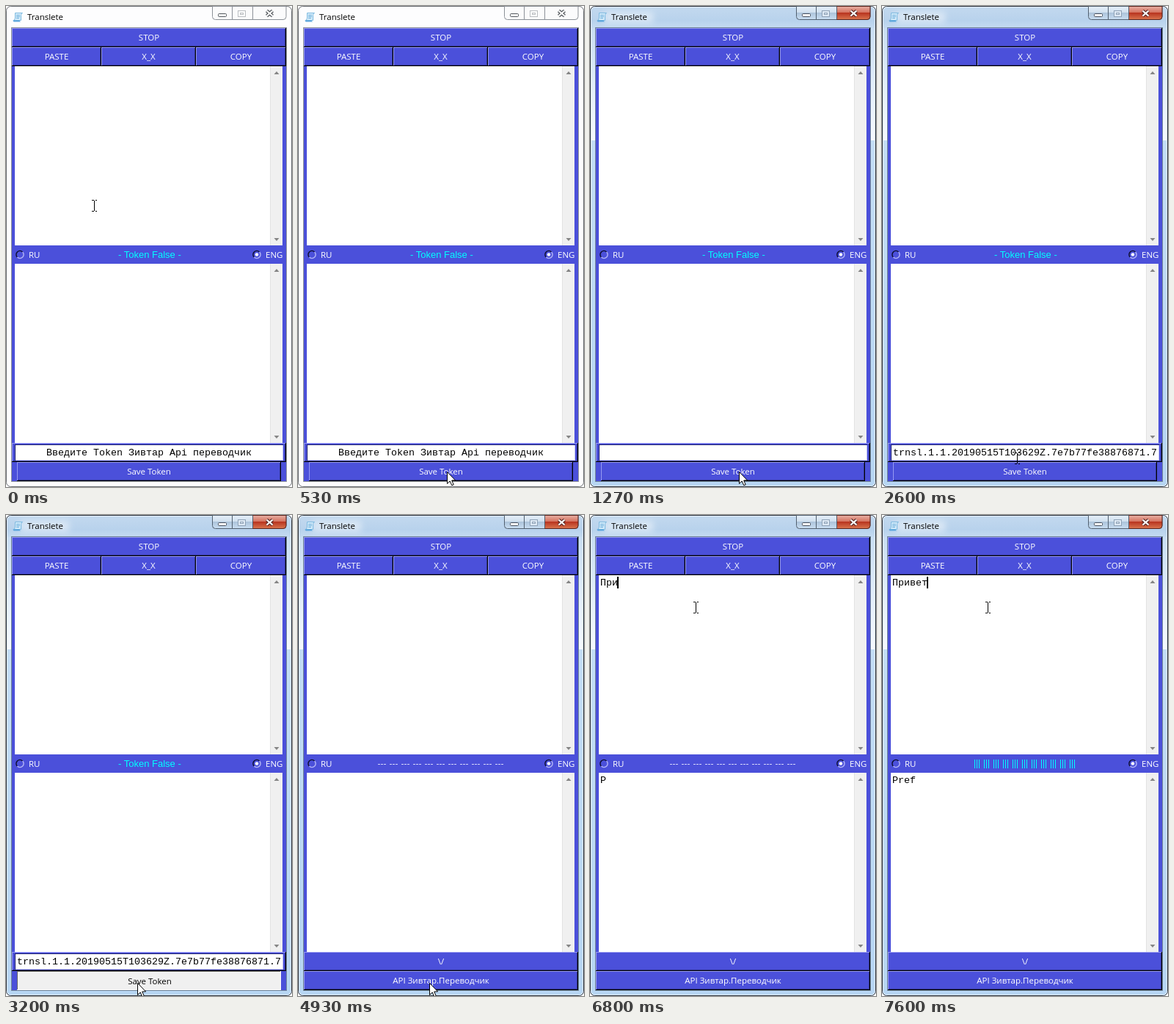
An HTML page that plays this animation: 390 px wide and 655 px high, repeating every 8000 ms.

```html
<!DOCTYPE html>
<html lang="ru">
<head>
<meta charset="utf-8">
<title>Translete</title>
<style>
  html, body { margin: 0; width: 100%; height: 100%; overflow: hidden; background: #fff; }
  svg { display: block; width: 390px; height: 655px; }
  text { white-space: pre; }
  .ui { font: 11.5px "Open Sans", "Noto Sans", sans-serif; }
  .mono { font: 13.333px "Liberation Mono", monospace; fill: #000; }
  .status { font: 13px "Liberation Sans", sans-serif; fill: #00ffff; }
  rect { shape-rendering: crispEdges; }
  .soft { shape-rendering: auto; }
</style>
</head>
<body>
<svg id="stage" viewBox="0 0 390 655" xmlns="http://www.w3.org/2000/svg"></svg>
<script>
const LOOP = 8000, TICK = 1000 / 15;
const BLUE = '#4b50da';

const rect = (x, y, w, h, fill, more = '') =>
  `<rect x="${x}" y="${y}" width="${w}" height="${h}" fill="${fill}" ${more}/>`;
const path = (d, more) => `<path d="${d}" ${more}/>`;
const text = (x, y, s, cls, more = '') =>
  `<text x="${x}" y="${y}" class="${cls}" ${more}>${s}</text>`;
const label = (x, y, s, fill = '#fff') =>
  text(x, y, s, 'ui', `text-anchor="middle" fill="${fill}"`);
const group = (id, body) => `<g id="${id}">${body}</g>`;
const gradient = (id, stops, dir = 'x2="0" y2="1"') =>
  `<linearGradient id="${id}" ${dir}>` +
  stops.map(([o, c]) => `<stop offset="${o}" stop-color="${c}"/>`).join('') +
  '</linearGradient>';

function bevel(x, y, w, h) {
  return rect(x, y, w, h, '#000') +
    rect(x, y, w - 1, h - 1, '#9699f2') +
    rect(x + 1, y + 1, w - 2, h - 2, '#30338f') +
    rect(x + 1, y + 1, w - 3, h - 3, BLUE);
}

const button = (x, y, w, h, s, cx = x + w / 2) => bevel(x, y, w, h) + label(cx, y + 17, s);

function textArea(y) {
  const arrow = (ay, d) =>
    path(`M365.5 ${ay - 2 * d}h7l-3.5 ${4 * d}z`, 'fill="#858585"');
  return rect(12, y, 348, 244, '#fff') + rect(360, y, 17, 244, '#f0f0f0') +
    rect(360, y, 1, 244, '#e3e3e3') + arrow(y + 9, -1) + arrow(y + 236, 1);
}

function radio(cx, on) {
  const cy = 338.5, r = 5;
  const arc = (sweep, stroke) =>
    path(`M${cx - 3.6} ${cy + 3.6}A${r} ${r} 0 0 ${sweep} ${cx + 3.6} ${cy - 3.6}`,
      `fill="none" stroke="${stroke}" stroke-width="1.4"`);
  return arc(1, '#0b0c2c') + arc(0, '#b4b6f6') +
    (on ? `<circle cx="${cx}" cy="${cy}" r="2.3" fill="#fff"/>` : '');
}

// Window frame with its three caption buttons.
function chrome(active) {
  const outline = active ? '#52606f' : '#8c9198';
  const strip = 'M281.5 .5V14.5Q281.5 18.5 285.5 18.5H378Q382 18.5 382 14.5V.5Z';
  const glyph = active ? '#fff' : '#f8f8f8';
  const edge = active ? '#4b5360' : '#555a60';
  let s = rect(0, 0, 390, 655, '#fff');
  s += rect(.5, .5, 389, 654, active ? 'url(#glass)' : '#fdfdfe',
    `rx="6" class="soft" stroke="${active ? '#2b3440' : '#6a6e73'}"`);
  if (active) {
    s += rect(2, 30, 5, 153, 'url(#side)') + rect(383, 30, 5, 153, 'url(#side)');
    s += rect(20, 8, 66, 15, '#fff', 'class="soft" opacity=".45" filter="url(#blur)"');
    s += rect(1.5, 1.5, 387, 652, 'none', 'rx="5" class="soft" stroke="#fff" stroke-opacity=".6"');
  }
  s += path(strip, `fill="${active ? 'url(#cap)' : '#fbfbfc'}" stroke="${outline}"`);
  if (active) {
    s += path('M336.5 .5V18.5H378Q382 18.5 382 14.5V.5Z', 'fill="url(#red)" stroke="#5a231c"');
  }
  s += path('M308.5 1V18M336.5 1V18', `stroke="${outline}" fill="none"`);
  s += rect(289.5, 10.5, 11, 4, glyph, `rx="1" class="soft" stroke="${edge}"`);
  const dim = active ? '#8fa2b6' : '#b9bcc0';
  s += rect(316.5, 6.5, 10, 8, active ? '#dfeaf5' : '#fff', `class="soft" stroke="${dim}"`) +
    rect(319.5, 9.5, 4, 2, 'none', `class="soft" stroke="${dim}"`);
  const cross = 'M355.5 6.5L363.5 13.5M363.5 6.5L355.5 13.5';
  s += path(cross, `stroke="${active ? '#5c2b27' : '#4c5055'}" stroke-width="4.4"`) +
    path(cross, 'stroke="#fff" stroke-width="2.3"');
  return s + rect(7, 29, 376, 619, active ? '#6d8196' : '#8a8f98');
}

const defs = '<defs>' +
  gradient('glass', [[0, '#c3d9ef'], [.03, '#b8d2ec'], [.05, '#c9def3'],
    [.28, '#c4def6'], [1, '#b7d6f3']]) +
  gradient('side', [[0, '#c9def3'], [.5, '#e2eefa'], [1, '#f6faff']]) +
  gradient('cap', [[0, '#e6f0fa'], [.48, '#cfdfee'], [.5, '#adc4db'], [1, '#c9def1']]) +
  gradient('red', [[0, '#e8b0a5'], [.48, '#d4705c'], [.5, '#b93520'], [1, '#d9754f']]) +
  '<filter id="blur" x="-20%" y="-60%" width="140%" height="220%"><feGaussianBlur stdDeviation="4"/></filter></defs>';

const icon =
  path('M12.5 9.5H22.5Q20.5 10.5 20.5 12.5V19.5H10.5Q12.5 18 12.5 16Z',
    'fill="#d3ebfa" stroke="#7db9df"') +
  path('M9.5 19.5H18.5Q19 21.5 20.5 21.5H11Q9.5 21.5 9.5 19.5Z', 'fill="#5ba6dc"') +
  path('M14 12.5H19M14 14.5H19M14 16.5H18', 'stroke="#6eafdb" fill="none"');

const face =
  rect(8, 30, 374, 617, BLUE) +
  button(8, 30, 374, 26, 'STOP') +
  button(8, 56, 122, 26, 'PASTE') +
  button(130, 56, 129, 26, 'X_X') +
  button(259, 56, 123, 26, 'COPY') +
  textArea(82) + textArea(351) +
  radio(19, false) + text(31, 343, 'RU', 'ui', 'fill="#fff"') +
  radio(342, true) + text(354, 343, 'ENG', 'ui', 'fill="#fff"');

const tokenForm =
  text(153, 343, '- Token False -', 'status') +
  bevel(8, 595, 374, 26) +
  rect(12, 597, 366, 22, '#1f2270') + rect(13, 598, 365, 21, '#c9cbf7') +
  rect(13, 598, 364, 20, '#fff') +
  '<text id="entry" class="mono" y="612"></text>' +
  rect(194, 600, 2, 17, '#000', 'id="entryCaret"') +
  button(15, 621, 360, 26, 'Save Token', 195) +
  group('pressed',
    rect(15, 621, 360, 26, '#fff') + rect(15, 621, 359, 25, '#6a6a6a') +
    rect(16, 622, 358, 24, '#f0f0f0') + label(196, 639, 'Save Token', '#000'));

const mainForm =
  group('idle', path('M109 339.5H281',
    'stroke="#d4d5fa" stroke-dasharray="3 1 3 1 3 5" fill="none"')) +
  group('busy', path('M126 339H264',
    'stroke="#00ffff" stroke-width="12" stroke-dasharray="1 2 1 2 1 6" fill="none" shape-rendering="crispEdges"')) +
  button(8, 595, 374, 26, '\\/') +
  button(8, 621, 374, 26, 'API Зивтар.Переводчик') +
  '<text id="typed" class="mono" x="14" y="96"></text>' +
  '<text id="result" class="mono" x="14" y="365"></text>' +
  rect(13, 84, 2, 16, '#000', 'id="caret"');

const pointer =
  group('arrow', path('M.5 .5V16.5L4.2 13L6.8 18.8L9.2 17.8L6.7 12H11.6Z',
    'fill="#fff" stroke="#000"')) +
  group('beam', path('M-3 -7.5H-.5M1.5 -7.5H4M.5 -7V7M-3 7.5H-.5M1.5 7.5H4',
    'stroke="#000" fill="none" shape-rendering="crispEdges"'));

document.getElementById('stage').innerHTML = defs +
  group('inactive', chrome(false)) + group('active', chrome(true)) + icon +
  text(29, 19, 'Translete', 'ui', 'fill="#000"') + face +
  group('tokenForm', tokenForm) + group('mainForm', mainForm) + group('pointer', pointer);

const $ = id => document.getElementById(id);
const show = (id, on) => { $(id).style.display = on ? '' : 'none'; };
const within = (t, ...spans) => spans.some(([a, b]) => t >= a && t < b);
const latest = (t, list) => list.reduce((v, [at, s]) => t >= at ? s : v, '');

// Pointer stops: time, x, y
const stops = [
  [0, 120, 272], [533, 203, 634], [1267, 203, 634], [1733, 186, 608],
  [2400, 186, 608], [3000, 179, 637], [4933, 179, 637], [5533, 144, 126], [LOOP, 144, 126]
];
const entries = [
  [0, 'Введите Token Зивтар Api переводчик', 55], [870, 'Token не работает', 135],
  [1270, '', 15], [2400, 'trnsl.1.1.20190515T103629Z.7e7b77fe38876871.7', 15]
];
const typing = [[6330, 'П'], [6600, 'Пр'], [6800, 'При'], [6930, 'Прив'], [7270, 'Приве'], [7400, 'Привет']];
const results = [[6600, 'P'], [7270, 'Pref']];

function pointerAt(t) {
  const q = Math.floor((t + 3.5) / TICK) * TICK + 1;
  const i = Math.max(0, stops.findIndex(s => s[0] > q) - 1);
  const [t0, x0, y0] = stops[i], [t1, x1, y1] = stops[i + 1];
  const p = Math.min(1, Math.max(0, (q - t0) / (t1 - t0)));
  const e = p * p * (3 - 2 * p);
  return [Math.round(x0 + (x1 - x0) * e), Math.round(y0 + (y1 - y0) * e)];
}

function draw(t) {
  const main = t >= 4930;
  show('inactive', t < 670);
  show('active', t >= 670);
  show('tokenForm', !main);
  show('mainForm', main);
  show('pressed', within(t, [670, 870], [1200, 1270], [3200, 4930]));
  show('entryCaret', within(t, [1800, 2400]));
  show('idle', t < 7270);
  show('busy', t >= 7270);

  const [, s, x] = entries.filter(e => t >= e[0]).pop();
  $('entry').textContent = s;
  $('entry').setAttribute('x', x);

  const typed = latest(t, typing);
  $('typed').textContent = typed;
  $('result').textContent = latest(t, results);
  $('caret').setAttribute('x', typed ? 13 + typed.length * 8 : 14);
  $('caret').setAttribute('width', typed ? 2 : 1);
  show('caret', within(t, [5600, 6200], [6600, 7400], [7600, LOOP]));

  const [px, py] = pointerAt(t);
  const inArea = within(py, [82, 326], [351, 595]);
  const beam = inArea || (!main && within(py, [597, 619]));
  show('beam', beam);
  show('arrow', !beam);
  $('pointer').setAttribute('transform', `translate(${px} ${py})`);
}

const start = performance.now();
function frame(now) {
  draw(Math.max(0, now - start) % LOOP);
  requestAnimationFrame(frame);
}
draw(0);
requestAnimationFrame(frame);
</script>
</body>
</html>
```
